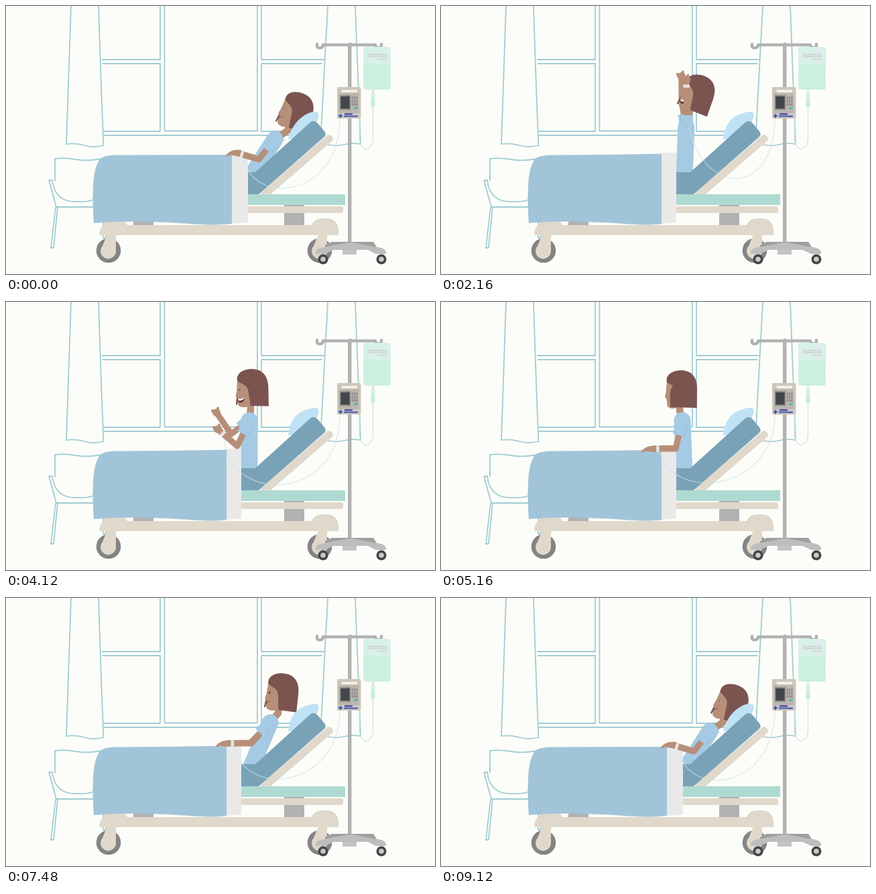
Write an HTML page with a canvas that moves like this. It is 640 px wide and 400 px high and loops after 10000 ms.

```html
<!DOCTYPE html>
<html lang="en">
<head>
<meta charset="utf-8">
<title>Hospital bed</title>
<style>
  html, body { margin: 0; width: 100%; height: 100%; overflow: hidden; background: #fcfdf8; }
  canvas { display: block; width: 640px; height: 400px; }
</style>
</head>
<body>
<canvas id="stage" width="640" height="400"></canvas>
<script>
const ctx = document.getElementById('stage').getContext('2d');
const LOOP = 10000;
const C = {
  paper: '#fcfdf8', outline: '#a2ccd5', beige: '#e0d8ca', metal: '#b2b2b2', tire: '#848484',
  mattress: '#7aa2b7', mint: '#aedad2', blanket: '#a2c4d8', sheet: '#e9e9ea', pillow: '#bfe2f5',
  shirt: '#a5cae3', hem: '#8ab4d0', skin: '#b78f79', hair: '#7b5450', dark: '#4b3434'
};

function fill(color, path) {
  ctx.fillStyle = color;
  ctx.fill(new Path2D(path));
}
function line(color, width, path, cap = 'butt') {
  ctx.strokeStyle = color;
  ctx.lineWidth = width;
  ctx.lineCap = cap;
  ctx.lineJoin = 'round';
  ctx.stroke(new Path2D(path));
}
function rect(color, x, y, w, h, r = 0) {
  ctx.fillStyle = color;
  ctx.beginPath();
  ctx.roundRect(x, y, w, h, r);
  ctx.fill();
}
function disc(color, x, y, rx, ry = rx) {
  ctx.fillStyle = color;
  ctx.beginPath();
  ctx.ellipse(x, y, rx, ry, 0, 0, 7);
  ctx.fill();
}
function at(x, y, draw, angle = 0) {
  ctx.save();
  ctx.translate(x, y);
  ctx.rotate(angle * Math.PI / 180);
  draw();
  ctx.restore();
}
const mix = (a, b, p) => Array.isArray(a) ? a.map((v, i) => mix(v, b[i], p)) : a + (b - a) * p;

// Poses
const sit = {
  neck: [357, 162], tilt: 0, shoulder: [360, 177], elbow: [350, 219], hand: [314, 219],
  farElbow: [351, 218], farHand: [316, 219], tube1: [340, 300], tube2: [497, 285],
  turn: 0, smile: 0, fist: 0, eye: 1, cover: 0, press: 0
};
const lie = {
  ...sit, neck: [420, 186], tilt: 20, shoulder: [401, 199], elbow: [377, 229], hand: [343, 219],
  farElbow: [376, 228], farHand: [345, 219], tube1: [362, 300], tube2: [497, 290],
  eye: 0, cover: 1, press: 1
};
const settle = { ...lie, neck: [419, 185], tilt: 18, shoulder: [400, 198], press: .6 };
const recline = {
  ...sit, neck: [406, 172], tilt: 6, shoulder: [394, 186], elbow: [366, 217], hand: [328, 217],
  farElbow: [365, 216], farHand: [330, 217], tube1: [350, 300], tube2: [497, 287]
};
const cheer = {
  ...sit, neck: [365, 160], tilt: -1, shoulder: [363, 177], elbow: [345, 215], hand: [316, 190],
  farElbow: [336, 197], farHand: [314, 165], tube1: [325, 300], tube2: [497, 305],
  smile: 1, fist: 1, eye: .3
};
const raise = { ...cheer, tilt: 6, elbow: [340, 158], hand: [318, 120], farElbow: [344, 152], farHand: [326, 112], smile: 0 };
const stretch = {
  ...cheer, neck: [374, 160], tilt: 30, shoulder: [368, 184], elbow: [387, 138], hand: [405, 102],
  farElbow: [371, 136], farHand: [385, 99], tube1: [380, 265], tube2: [495, 305], eye: 0
};
const chest = { ...cheer, elbow: [351, 213], hand: [333, 180], farElbow: [346, 200], farHand: [332, 160] };
const away = { ...sit, neck: [356, 162], turn: 1 };

const ease = {
  both: p => p * p * (3 - 2 * p),
  start: p => p * p,
  end: p => p * (2 - p),
  even: p => p
};
const keys = [
  [0, lie], [760, lie], [1200, sit, 'both'], [1480, sit],
  [1980, raise, 'start'], [2520, stretch, 'end'], [3040, stretch], [4040, chest, 'both'],
  [4080, chest], [4120, cheer, 'even'], [4280, sit, 'end'], [4720, sit], [5240, away, 'both'],
  [6720, away], [7480, recline, 'start'], [7760, { ...settle, cover: 0 }, 'end'],
  [8160, settle, 'both'], [8760, settle], [9120, lie, 'both'], [LOOP, lie]
];
// Spans drawn at half the usual rate
const slowSpans = [[800, 1280], [4120, 4280], [4760, 5240]];

function poseAt(time) {
  const span = slowSpans.find(([from, to]) => time >= from && time < to);
  time = span ? span[0] + Math.floor((time - span[0]) / 80) * 80 : Math.floor(time / 40) * 40;
  const i = keys.findIndex(key => key[0] > time);
  const [t0, a] = keys[i - 1], [t1, b, curve = 'even'] = keys[i];
  const p = ease[curve]((time - t0) / (t1 - t0));
  return Object.fromEntries(Object.keys(a).map(k => [k, mix(a[k], b[k], p)]));
}

function drawRoom() {
  rect(C.paper, 0, 0, 640, 400);
  const o = path => line(C.outline, 1.8, path);
  o('M143 80H230V0M144 86H230V187H145M236.500 0V186.500H375V0M381 0V80H475M472 86H381V187H470M146 193H470');
  o('M97 0L90 206Q104 204 117 208T145.500 208Q141 100 138 0');
  o('M480 0L470 187M521 0L529 206Q515 204 503 207T476 206');
  o('M73 261V228Q88 226 104 229T143 228V240M64 260H69Q73 292 103 292Q122 293 131 289M64 260L75 300H132');
  o('M74 300L67 361H71L77 300M145 322V346H149V342');
}

function drawWheel(x) {
  at(x, 365, () => {
    disc(C.tire, 0, 0, 18.3);
    fill(C.beige, 'M-2 -24H11V1A11.500 11.500 0 1 1 -9 -7Z');
  });
}

function drawFrame() {
  rect(C.metal, 415, 294, 30, 34);
  rect(C.metal, 190, 316, 30, 12);
  drawWheel(153);
  drawWheel(468);
  fill(C.beige, 'M139 342Q139 333 144 328Q148 320 157 320H170Q178 320 181 327H456Q460 317 471 317H480Q493 318 496 331V342Z');
  rect(C.beige, 340, 299, 163, 10, 3);
  line(C.beige, 11.5, 'M386 281L482 198', 'round');
}

function drawMattress(press) {
  fill(C.pillow, `M421 199Q${424 + 4 * press} ${166 + 5 * press} 451 160Q463 155 466 160Q468 166 461 177L436 197Z`);
  fill(C.mattress, 'M340 248H372L453 174.500Q459 169 465 175L475 187Q479 192 474 196L377 281H340Z');
  rect(C.mint, 340, 281, 166, 16, 1);
}

function drawBlanket(cover) {
  const left = 329 + 8 * cover, right = 351 + 10 * cover, top = 219 + 3 * cover;
  fill(C.blanket, `M131 324C129 290 127 239 142 227Q148 222.500 165 222.500Q250 222 ${left + 1} ${220.5 + 1.5 * cover}V325Q310 328 280 325.500Q190 319 131 324Z`);
  fill(C.sheet, `M${left} ${top}H${right}V323L${left} 325Z`);
}

function drawStand() {
  rect(C.metal, 510, 57, 5.5, 298);
  disc(C.metal, 513, 57.5, 3);
  line(C.metal, 4.5, 'M464 57Q463 62.500 468 62.500Q473 62.500 473 58H551Q551 62.500 556 62.500Q561 62.500 560 57', 'round');

  rect('#d9f0ea', 533, 61, 41, 64, 3);
  rect('#caf0df', 534, 88, 39, 36, 3);
  line('#d3d4d4', 1.8, 'M539 72.500H569M539 75.500H569M554 79.500H568');
  line('#cfe9e4', 3, 'M547.500 125V136');
  rect('#d9ece9', 544.5, 130, 6, 20, 2);
  rect('#c3ecd9', 545, 138, 5, 13, 2);
  line('#d2e9e7', 1.5, 'M547.500 150V198Q547 211 537 214Q527 210 527 197V167');

  rect('#cfc6ba', 494, 121, 35.5, 47, 1.5);
  rect('#f1eee8', 501, 125, 23, 4);
  rect('#bdb5ab', 496.5, 130, 30, 36);
  rect('#85898a', 498, 133, 16, 22);
  rect('#424549', 499.5, 135, 13, 18);
  for (let i = 0; i < 9; i++) rect('#8f9190', 515.5 + i % 3 * 3.3, 135 + (i / 3 | 0) * 5, 2.5, 4);
  rect('#57b8b4', 519, 151, 6, 3);
  rect('#cbc9cd', 495, 160, 33, 6);
  rect('#4657a4', 505, 160, 12, 2.5);
  line('#4657a4', 2, 'M496 164H502M499 161V167M504 164.500H525');

  fill('#9f9f9f', 'M476 357L486 352H548L553 360H476Z');
  fill('#bdbdbd', 'M462 366Q464 361 474 360L510 353H517L554 360Q565 361 567 367V370H552L540 364H488L477 370H462Z');
  rect('#c3c3c3', 502, 364, 21, 7);
  for (const x of [473, 560]) {
    disc('#454545', x, 378, 7.5);
    disc('#c9c9c9', x, 378, 3.8);
  }
}

function drawHand([x, y], fist) {
  at(x, y, () => {
    if (fist > .5) {
      disc(C.skin, 0, 0, 6.2, 5.8);
      line(C.skin, 4, 'M-5 -1L-6 -3M2 -4L2 -6.500', 'round');
    } else {
      fill(C.skin, 'M6 -4Q-3 -5 -8 -2Q-14 1 -15 5Q-12 6 -9 3L-6 4L6 5Z');
    }
  });
}

function drawArm(shoulder, elbow, hand, fist, near) {
  const cuff = mix(shoulder, elbow, .52);
  line(C.skin, 9, `M${shoulder}L${elbow}L${hand}`);
  drawHand(hand, fist);
  line(C.shirt, 18, `M${shoulder}L${cuff}`);
  if (!near) return;
  const dx = cuff[0] - shoulder[0], dy = cuff[1] - shoulder[1], s = 8.5 / Math.hypot(dx, dy);
  const back = [cuff[0] + dy * s, cuff[1] - dx * s];
  line(C.hem, .8, `M${mix(shoulder, cuff, .4).map((v, i) => v + back[i] - cuff[i])}L${back}`);
  line('#e6e6e4', 9.5, `M${mix(elbow, hand, .68)}L${mix(elbow, hand, .8)}`);
}

function drawHead({ neck, tilt, turn, smile, eye }) {
  at(...neck, () => {
    fill(C.skin, 'M-19 -46L-20.500 -27L-22 -20L-19.500 -17L-18.500 -7Q-17 -3 -10 -3L3 -5V-44Z');
    if (turn < .6) {
      disc(C.dark, -16, -29, 1.2, .4 + 1.5 * eye);
      if (smile > .4) {
        fill('#6e3838', 'M-20 -17Q-15 -14 -9 -18Q-9 -9 -17 -10Z');
        fill('#ffffff', 'M-20 -17Q-15 -14 -9 -18Q-10 -13 -18 -13Z');
      } else {
        line('#80594c', 1, 'M-19 -16L-14 -16.500');
      }
      fill(C.hair, 'M-20.500 -20L-22 -7L-20 -7L-18 -14Z');
    }
    const front = 15 * turn;
    fill(C.hair, `M-19 -42C-22 -55 -8 -60 2 -60C17 -60 ${27 - turn} -51 ${27 - turn} -32L${27 - 1.5 * turn} -4L${-front} -5L${-3 - front * .8} -27Q${-4 - front * .6} -34 -10 -37Z`);
  }, tilt);
}

function drawBody(p) {
  drawArm(p.shoulder, p.farElbow, p.farHand, p.fist, false);
  line(C.skin, 10.5, `M${p.shoulder}L${p.neck}L${p.neck[0] + p.tilt * .15} ${p.neck[1] - 8}`);
  line(C.shirt, 25, `M363 258L${p.shoulder}`, 'round');
  line(C.shirt, 18, `M${p.shoulder}L${mix(p.shoulder, p.neck, .5)}`);
  drawHead(p);
}

function drawTube(p) {
  const start = mix(p.elbow, p.hand, .68);
  line('rgba(200,228,232,.62)', 1.5, `M${start}C${p.tube1} ${p.tube2} 498 168`);
}

function frame(now) {
  const pose = poseAt(now % LOOP);
  drawRoom();
  drawFrame();
  drawBody(pose);
  drawMattress(pose.press);
  drawBlanket(pose.cover);
  drawTube(pose);
  drawArm(pose.shoulder, pose.elbow, pose.hand, pose.fist, true);
  drawStand();
}

const begin = performance.now();
function tick() {
  frame(performance.now() - begin);
  requestAnimationFrame(tick);
}
tick();
</script>
</body>
</html>
```
